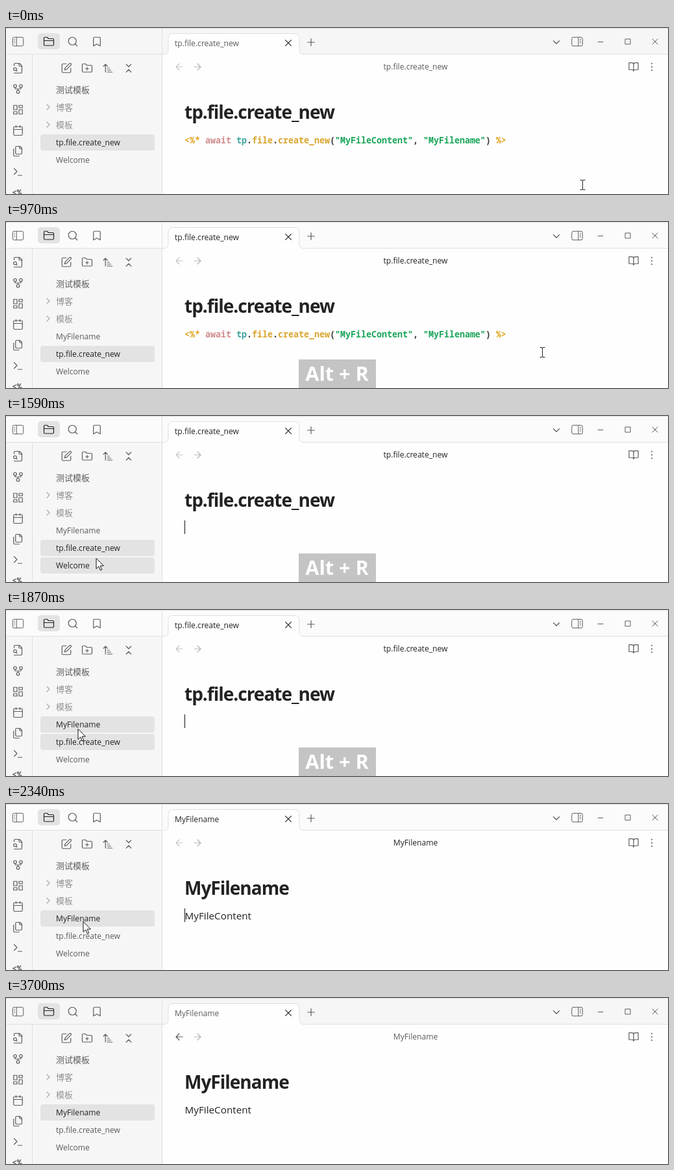
These frames come from a looping animation (1020 by 256 pixels, 3770 ms). An HTML page:

```html
<!DOCTYPE html>
<html lang="zh-CN">
<head>
<meta charset="utf-8">
<style>
html, body { margin: 0; width: 100%; height: 100%; overflow: hidden; background: #fefefe; }
svg { display: block; width: 1020px; height: 256px; }
text { font: 12.1px "Open Sans", "Noto Sans CJK SC", "Noto Sans CJK", sans-serif; white-space: pre; fill: #5c5c5c; }
.cjk { font-family: "Noto Sans CJK SC", "Noto Sans CJK", sans-serif; font-size: 13px; font-weight: 300; }
.icon { fill: none; stroke: #5c5c5c; stroke-linecap: round; stroke-linejoin: round; }
.title { fill: #222; }
#top { fill: #fbfbfb; }
.blur #top { fill: #f6f6f6; }
.blur .title { fill: #5c5c5c; }
.win .icon { stroke-linecap: butt; }
.bar { stroke: #dfdfdf; fill: none; }
.row rect { fill: none; }
.row.on rect { fill: #e3e3e3; }
.row.on text { fill: #222; }
.folder { fill: #929292; }
#fold .icon { stroke: #ababab; }
#active .icon { stroke: #222; }
#heading { font-size: 28px; font-weight: 700; letter-spacing: -1px; fill: #222; }
#body { font-size: 15.25px; fill: #222; }
#code { font: 600 13.333px "Noto Sans Mono", "DejaVu Sans Mono", monospace; fill: #333; }
#code .tag { fill: #dfa51c; font-weight: 700; }
#code .key { fill: #d08c8c; }
#code .obj { fill: #3fa5a0; }
#code .prop { fill: #d9a62e; }
#code .str { fill: #1ba65a; }
#keys text { font-size: 30.7px; font-weight: 700; fill: #fff; }
</style>
</head>
<body>
<svg id="app" viewBox="0 0 1020 256">
  <rect width="1020" height="256" fill="#fefefe"/>
  <rect y="40" width="240" height="216" fill="#f6f6f6"/>
  <rect id="top" width="1020" height="40"/>
  <path class="bar" d="M0 .5H1020M40.5 40V256M240.5 0V256"/>
  <path class="bar" style="fill:#fefefe" d="M0 40.5H244a6 6 0 0 0 6-6V15.5a7 7 0 0 1 7-7H445a7 7 0 0 1 7 7V34.5a6 6 0 0 0 6 6H1020"/>
  <rect x="49" y="8" width="34" height="25" rx="5" fill="#e3e3e3"/>
  <g id="icons"></g>
  <g id="active"></g>
  <g id="fold"></g>
  <g id="win" class="win"></g>
  <text x="9" y="258" style="font:600 13px 'Noto Sans Mono',monospace">&lt;%</text>
  <g id="rows"></g>
  <text id="tab" class="title" x="260" y="28"></text>
  <text id="head" class="title" x="631" y="64" text-anchor="middle"></text>
  <text id="heading" x="275" y="139.5"></text>
  <text id="body" x="275.5" y="178">MyFileContent</text>
  <text id="code" x="275" y="178"><tspan class="tag">&lt;%*</tspan> <tspan class="key">await</tspan> <tspan class="obj">tp</tspan>.<tspan class="prop">file</tspan>.<tspan class="prop">create_new</tspan>(<tspan class="str">"MyFileContent"</tspan>, <tspan class="str">"MyFilename"</tspan>) <tspan class="tag">%&gt;</tspan></text>
  <path id="caret" d="M275.5 161V182" stroke="#111"/>
  <g id="keys">
    <rect x="451" y="212" width="119" height="44" fill="#c4c4c4"/>
    <text x="510" y="245" text-anchor="middle">Alt + R</text>
  </g>
  <g id="mouse">
    <path id="beam" d="M-4-7.5h2.5q1.5 0 1.5 1.5q0-1.5 1.5-1.5h2.5M0-6V6M-4 7.5h2.5q1.5 0 1.5-1.5q0 1.5 1.5 1.5h2.5" fill="none" stroke="#222"/>
    <path id="arrow" d="M.5.5V16.5l3.8-3.6 2.6 6 2.4-1-2.6-5.9H12Z" fill="#fff" stroke="#111"/>
  </g>
</svg>
<script>
const $ = id => document.getElementById(id);
const show = (el, on) => { el.style.display = on ? '' : 'none'; };

// Icons use a 24-unit grid, centred on (x, y)
function icon(x, y, d, size = 18, parent = 'icons', id = '') {
  const s = size / 24, weight = parent === 'win' ? 1 : 1.2;
  $(parent).insertAdjacentHTML('beforeend',
    `<path ${id && `id="${id}"`} class="icon" stroke-width="${weight / s}" d="${d}"
      transform="translate(${x - size / 2} ${y - size / 2}) scale(${s})"/>`);
}
const folder = 'M20 20a2 2 0 0 0 2-2V8a2 2 0 0 0-2-2h-7.9a2 2 0 0 1-1.7-.9L9.6 3.9A2 2 0 0 0 7.9 3H4a2 2 0 0 0-2 2v13a2 2 0 0 0 2 2Z';
const panel = 'M4 3h16a3 3 0 0 1 3 3v12a3 3 0 0 1-3 3H4a3 3 0 0 1-3-3V6a3 3 0 0 1 3-3Z';
const cross = 'M4 4 20 20M20 4 4 20';

// Top bar
icon(18.5, 21, panel + 'M9 3V21M4 7.5h2M4 11h2M4 14.5h2', 18, 'win');
icon(66, 21, folder + 'M2 10H22', 18, 'active');
icon(103, 21, 'M19 11a8 8 0 1 1-16 0 8 8 0 0 1 16 0ZM21 21l-4.3-4.3');
icon(140, 21, 'm19 21-7-4-7 4V5a2 2 0 0 1 2-2h10a2 2 0 0 1 2 2Z');
icon(435, 23, cross, 13, 'active');
icon(470, 22, 'M12 2V22M2 12H22', 13);
icon(848, 22, 'm6 9 6 6 6-6');
icon(880, 21, panel + 'M14.5 3V21M17.5 7.5h2.5M17.5 11h2.5M17.5 14.5h2.5', 18, 'win');
icon(916, 21.5, 'M4 12H20', 13, 'win');
icon(958, 21, 'M4 4H20V20H4Z', 12, 'win');
icon(1000, 21, cross, 13, 'win');

// Ribbon
icon(18.5, 62, 'M4 22h14a2 2 0 0 0 2-2V7l-5-5H6a2 2 0 0 0-2 2v3M14 2v4a2 2 0 0 0 2 2h4M9 14a3 3 0 1 1-6 0 3 3 0 0 1 6 0ZM10 18l-1.9-1.9');
icon(18.5, 94, 'M15 18a3 3 0 1 1-6 0 3 3 0 0 1 6 0ZM9 6a3 3 0 1 1-6 0 3 3 0 0 1 6 0ZM21 6a3 3 0 1 1-6 0 3 3 0 0 1 6 0ZM18 9v2q0 1-1 1H7q-1 0-1-1V9M12 12v3');
icon(18.5, 126, 'M3 3h7v9H3ZM14 3h7v5h-7ZM14 12h7v9h-7ZM3 16h7v5H3Z');
icon(18.5, 158, 'M5 4h14a2 2 0 0 1 2 2v14a2 2 0 0 1-2 2H5a2 2 0 0 1-2-2V6a2 2 0 0 1 2-2ZM16 2v4M8 2v4M3 10H21');
icon(18.5, 190, 'M20 7h-3a2 2 0 0 1-2-2V2M9 18a2 2 0 0 1-2-2V4a2 2 0 0 1 2-2h7l4 4v10a2 2 0 0 1-2 2ZM3 7.6v12.8A1.6 1.6 0 0 0 4.6 22h9.8');
icon(18.5, 222, 'm4 17 6-6-6-6M12 19h8');

// File list tools
icon(93, 62, 'M12 3H5a2 2 0 0 0-2 2v14a2 2 0 0 0 2 2h14a2 2 0 0 0 2-2v-7M18.4 2.6a1 1 0 0 1 3 3l-9 9-4 1 1-4Z');
icon(125, 62, folder + 'M12 10v6M9 13h6');
icon(157, 62, 'm3 8 4-4 4 4M7 4V20M11 12h4M11 16h7M11 20h10');
icon(189, 62, 'm7 20 5-5 5 5M7 4l5 5 5-5');

// Note header
const left = 'm12 19-7-7 7-7M19 12H5';
icon(267, 60, left, 17, 'icons', 'back');
icon(295, 60, 'm12 5 7 7-7 7M5 12H19', 17, 'icons', 'forward');
$('forward').style.stroke = '#b5b5b5';
icon(967, 60, 'M2 3h6a4 4 0 0 1 4 4v14a3 3 0 0 0-3-3H2ZM22 3h-6a4 4 0 0 0-4 4v14a3 3 0 0 1 3-3h7Z', 17);
icon(995, 60, 'M12 5h.01M12 12h.01M12 19h.01', 18, 'icons', 'more');
$('more').style.strokeWidth = 2.8;

// File list
const PAGE = 'tp.file.create_new', NEW = 'MyFilename';
const rowY = k => 95 + 27 * k;
function row(name, k, cls = '') {
  $('rows').insertAdjacentHTML('beforeend',
    `<g class="row"><rect x="53" y="-12" width="176" height="25" rx="4"/><text class="${cls}" x="77" y="5">${name}</text></g>`);
  const el = $('rows').lastChild;
  el.setAttribute('transform', `translate(0 ${rowY(k)})`);
  return el;
}
row('测试模板', 0, 'cjk');
row('博客', 1, 'cjk folder');
row('模板', 2, 'cjk folder');
for (const k of [1, 2]) icon(65, rowY(k), 'm9 18 6-6-6-6', 16, 'fold');
const files = [NEW, PAGE, 'Welcome'].map(name => ({ name, el: row(name, 3) }));

const ticks = [0, 70, 130, 190, 250, 300, 360, 510, 840, 910, 970, 1040, 1240, 1310,
  1380, 1450, 1520, 1590, 1660, 1730, 1800, 1870, 1940, 2140, 2340, 2460, 2530, 2600,
  2650, 2700, 2750, 2880, 2950, 3020, 3100, 3170, 3240, 3370, 3700];
// Mouse path: time, x, y
const path = [[0, 888, 242], [70, 886, 241], [360, 831, 204], [510, 826, 201], [1040, 826, 201],
  [1310, 300, 224], [1380, 228, 221], [1590, 138, 219], [1870, 110, 183], [1940, 110, 183],
  [2140, 118, 181], [2460, 118, 181], [2750, 720, 207], [2880, 800, 222], [3020, 897, 238],
  [3170, 927, 275], [3770, 927, 275]];

function mouseAt(t) {
  const i = path.findIndex(p => p[0] > t);
  const [a, b] = [path[i - 1], path[i]];
  const u = (t - a[0]) / (b[0] - a[0]);
  return [a[1] + (b[1] - a[1]) * u, a[2] + (b[2] - a[2]) * u];
}

function draw(now) {
  const time = now % 3770;
  const t = ticks.filter(v => v <= time).pop();
  const within = (a, b) => t >= a && t < b;
  const [x, y] = mouseAt(t).map(Math.round);
  const opened = t >= 2140, created = t >= 910;
  const name = opened ? NEW : PAGE;

  $('app').classList.toggle('blur', !within(70, 3700));
  for (const id of ['tab', 'head', 'heading']) $(id).textContent = name;
  show($('code'), t < 1240);
  show($('body'), opened);
  show($('caret'), within(1240, 1940) || within(2140, 2700) || within(3170, 3700));
  show($('keys'), within(840, 1940));
  $('back').style.stroke = t >= 2460 ? '#5c5c5c' : '#c4c4c4';

  const active = t >= 2340 ? NEW : PAGE;
  files.forEach((f, i) => {
    const cy = rowY(i + (created ? 3 : 2));
    const hover = x >= 53 && x < 229 && Math.abs(y - cy) < 13;
    f.el.setAttribute('transform', `translate(0 ${cy})`);
    f.el.classList.toggle('on', f.name === active || hover);
    show(f.el, created || i > 0);
  });

  $('mouse').setAttribute('transform', `translate(${x + .5} ${y})`);
  show($('arrow'), x < 241);
  show($('beam'), x >= 241);
}

const start = performance.now();
function loop() {
  draw(performance.now() - start);
  requestAnimationFrame(loop);
}
loop();
</script>
</body>
</html>
```
